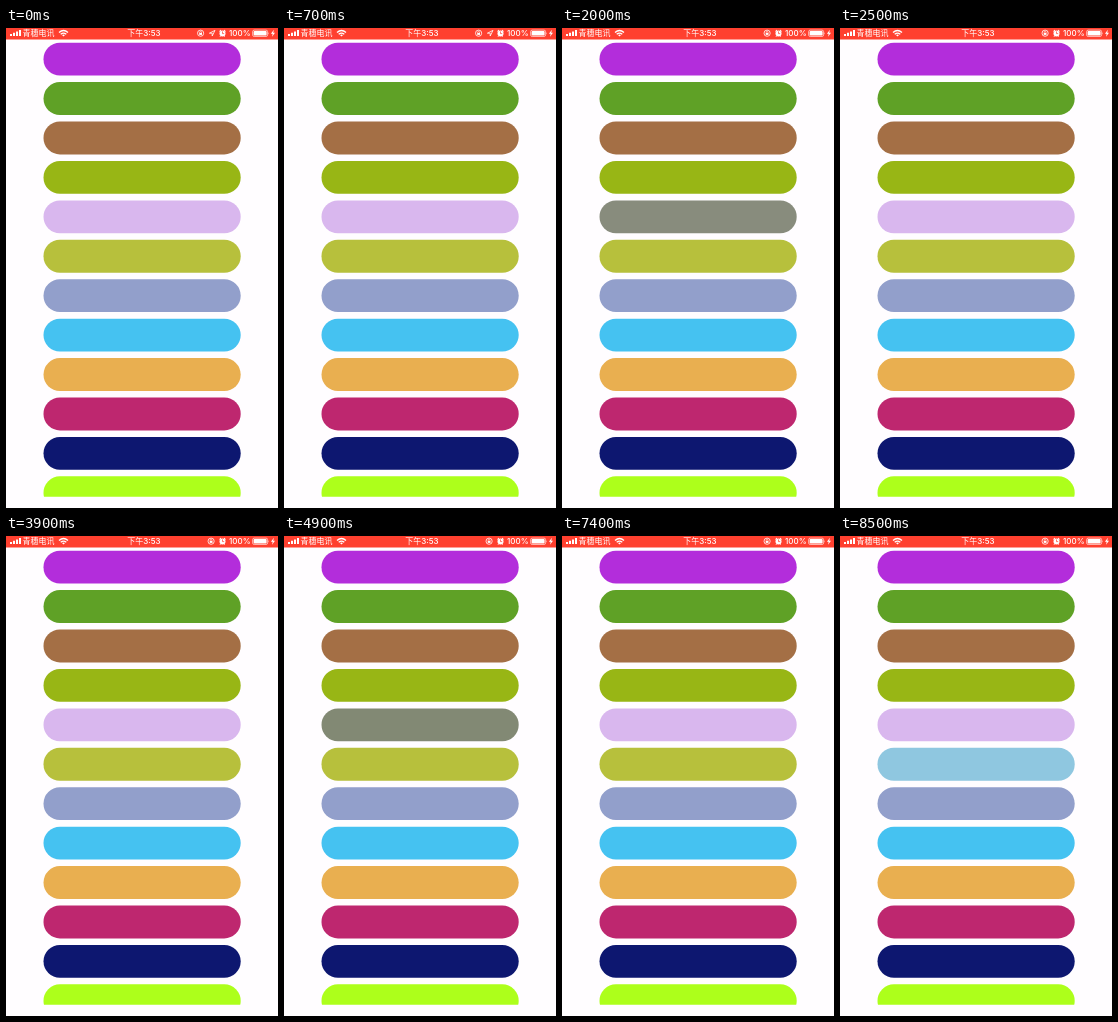
Animation of 272x480 px, one loop 9.1 s. Source, as an HTML page:

```html
<!DOCTYPE html>
<html lang="zh">
<head>
<meta charset="utf-8">
<style>
  html, body { margin: 0; width: 100%; height: 100%; overflow: hidden; background: #fffdff; }
  svg { display: block; width: 272px; height: 480px; }
  text { font: 500 8px Inter, "Noto Sans CJK SC", sans-serif; fill: #fff; }
  .line { fill: none; stroke: #fff; }
</style>
</head>
<body>
<svg viewBox="0 0 272 480">
  <clipPath id="list"><rect y="11.5" width="272" height="457.3"/></clipPath>
  <g id="pills" clip-path="url(#list)"></g>
  <rect width="272" height="11.5" fill="#ff402f"/>
  <g fill="#fff">
    <path d="M4 6h2v2h-2zM7 4.8h2v3.2h-2zM10 3.4h2v4.6h-2zM13 2h2v6h-2z"/>
    <text x="16.5" y="8.3">青穗电讯</text>
    <g class="line" stroke-width="1.3">
      <path d="M53 4.4Q57.5 0.6 62 4.4M54.7 6.2Q57.5 3.9 60.3 6.2"/>
    </g>
    <path d="M57.5 8.6L56 7.1Q57.5 6 59 7.1z"/>
    <text x="138" y="8.3" text-anchor="middle">下午3:53</text>
    <g id="lock">
      <circle class="line" cx="0" cy="5.2" r="3.1" stroke-width=".8"/>
      <rect x="-1.4" y="4.9" width="2.8" height="2"/>
      <path class="line" d="M-.9 5V4.2a.9 .9 0 0 1 1.8 0V5" stroke-width=".6"/>
    </g>
    <path id="arrow" class="line" d="M209 2.4L203.4 5.2H206.2V8z" stroke-width=".8"/>
    <circle cx="216.5" cy="5.4" r="3"/>
    <path class="line" d="M213.3 3.4L215 2M219.7 3.4L218 2M214.8 7.9L214 8.7M218.2 7.9L219 8.7"/>
    <path d="M216.5 3.4V5.6H218.2" fill="none" stroke="#ff402f" stroke-width=".7"/>
    <text x="223" y="8.3">100%</text>
    <rect class="line" x="246.6" y="2.1" width="15" height="6.4" rx="1.6" stroke-width=".6"/>
    <rect x="247.6" y="3.1" width="13" height="4.4" rx=".8"/>
    <path d="M262.3 4.2q1 1.1 0 2.2zM267.9 1.8L264.9 5.7H266.7L266 8.8L269 4.7H267.2z"/>
  </g>
</svg>
<script>
const LOOP = 9100, STEP = 100;
const LILAC = [217, 183, 238], GREY = [130, 137, 116];
const OLIVE = [183, 192, 60], BLUE = [143, 199, 224];
const colors = ['#b32ddb', '#5fa126', '#a46f45', '#98b615', '#d9b7ee', '#b7c03c',
  '#929fcb', '#45c2f1', '#e9af50', '#be276f', '#0d1770', '#adff1b'];

const byId = id => document.getElementById(id);
const pills = colors.map((color, i) => {
  const pill = document.createElementNS('http://www.w3.org/2000/svg', 'rect');
  const box = { x: 37.5, y: 14.7 + 39.42 * i, width: 197.2, height: 32.9, rx: 16.45, fill: color };
  for (const name in box) pill.setAttribute(name, box[name]);
  return byId('pills').appendChild(pill);
});

const ease = (t, start, length) => {
  const p = Math.min(1, Math.max(0, (t - start) / length));
  return p * p * (3 - 2 * p);
};
const between = (t, start, end) => t >= start && t < end ? 1 : 0;
const mix = (a, b, p) => `rgb(${a.map((v, i) => Math.round(v + (b[i] - v) * p))})`;

function draw(now) {
  const t = Math.floor(now % LOOP / STEP) * STEP;
  // The first press fades; later presses switch at once.
  const grey = ease(t, 800, 600) - ease(t, 1900, 600)
    + between(t, 3000, 3900) + between(t, 4900, 5600);
  const blue = between(t, 6600, 7300) + between(t, 8400, LOOP);
  pills[4].setAttribute('fill', mix(LILAC, GREY, grey));
  pills[5].setAttribute('fill', mix(OLIVE, BLUE, blue));

  const away = ease(t, 800, 400);
  byId('arrow').setAttribute('opacity', 1 - away);
  byId('lock').setAttribute('transform', `translate(${194.6 + 10.5 * away})`);
  requestAnimationFrame(draw);
}
draw(0);
</script>
</body>
</html>
```
